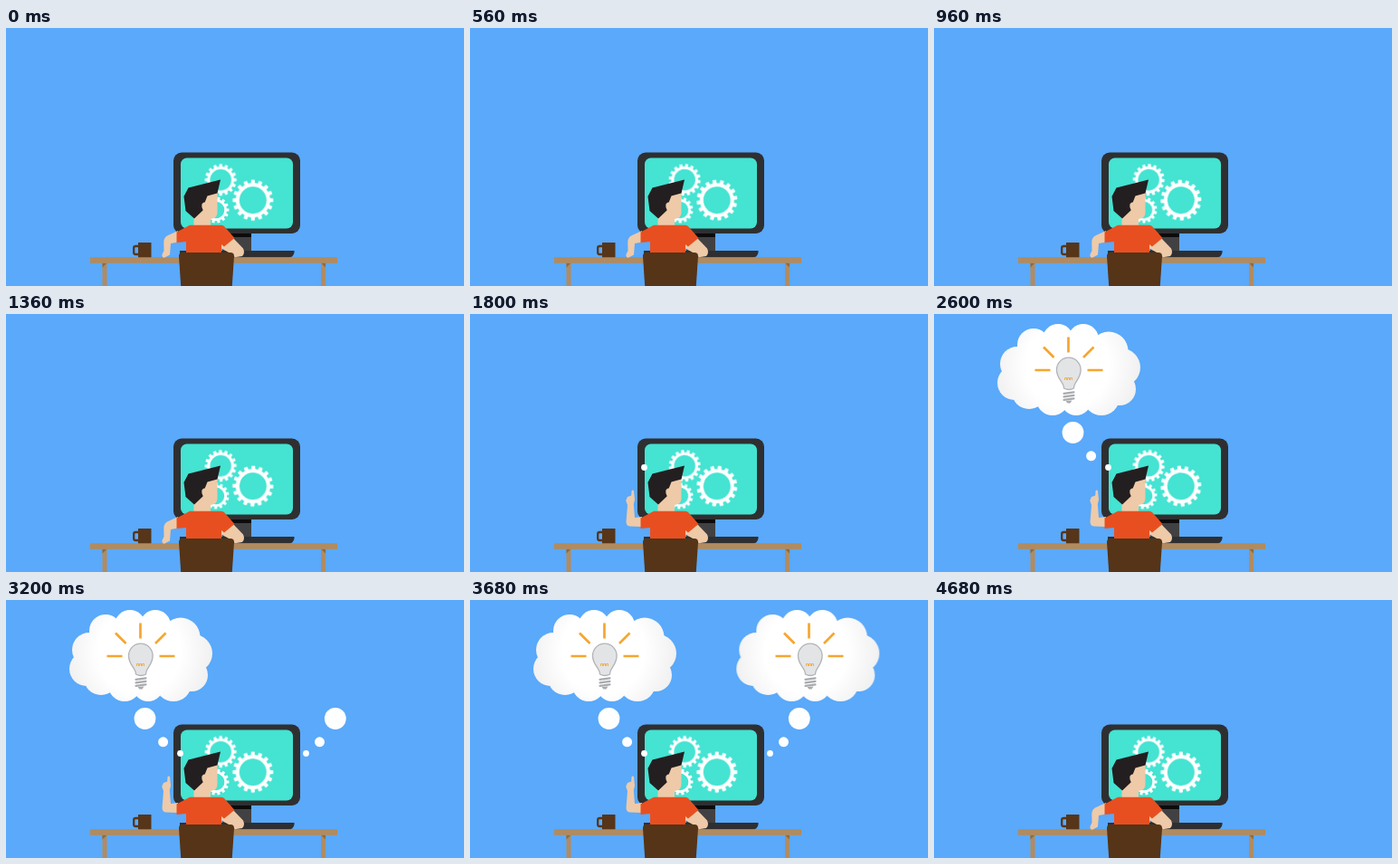
An HTML page for the animation above (4.72 s loop, 506 px wide and 285 px high).

```html
<!DOCTYPE html>
<html lang="en">
<head>
<meta charset="utf-8">
<title>Idea at the desk</title>
<style>
  html, body { margin: 0; width: 100%; height: 100%; overflow: hidden; background: #5aa9fa; }
  svg { display: block; width: 506px; height: 285px; }
  .late { opacity: 0; }
</style>
</head>
<body>
<svg viewBox="0 0 506 285">
  <defs>
    <radialGradient id="puff" gradientUnits="userSpaceOnUse" cx="147" cy="57" r="84">
      <stop offset=".55" stop-color="#fff"/>
      <stop offset="1" stop-color="#efeff0"/>
    </radialGradient>
    <g id="cloud" fill="url(#puff)"></g>
    <g id="bulb">
      <path d="M143.500 82 C143.500 75 135.500 72 135.500 61.500 A13.300 13.300 0 0 1 162.100 61.500 C162.100 72 154.500 75 154.500 82 Q149 85 143.500 82Z"
        fill="#e3e4e6" stroke="#b1b3b6" stroke-width="1.300"/>
      <path d="M144.500 73 V70.500 H146.500 V73 M147.500 73 V70.500 H149.500 V73 M150.500 73 V70.500 H152.500 V73"
        fill="none" stroke="#f2b04a" stroke-width="1"/>
      <path d="M143.500 87.800 L154.500 86.300 M143.500 91.300 L154.500 89.800 M143.500 94.800 L154.500 93.300"
        stroke="#a9abae" stroke-width="2.200" stroke-linecap="round"/>
      <path d="M145.500 96 L152.500 95.500 L150.500 98.600 H147.500Z" fill="#a9abae"/>
    </g>
    <path id="rays" d="M148.500 25.500V42.500 M121 36.500L132.500 48 M176.500 36.500L165 48 M111.500 62H128.500 M169.500 62H186.500"
      stroke="#f5a631" stroke-width="2.700"/>
  </defs>

  <rect width="506" height="285" fill="#5aa9fa"/>

  <!-- monitor -->
  <rect x="239" y="226" width="32" height="20" fill="#414143"/>
  <rect x="239" y="226" width="32" height="5" fill="#0c0c0d"/>
  <path d="M192 246H318.500V248Q317.500 253.500 312 253.500H192Z" fill="#2f2f31"/>
  <rect x="185" y="137.500" width="140" height="89.500" rx="9" fill="#2f2f31"/>
  <rect x="193" y="143.500" width="124" height="78" rx="7" fill="#44e3d2"/>
  <g id="gears" fill="#fff" fill-rule="evenodd"></g>

  <!-- desk and mug -->
  <path d="M106.500 259H111.500V285H106.500Z M348 259H353V285H348Z" fill="#b18b60"/>
  <path d="M106.500 259.500H111.500L106.500 264.500Z M348 259.500H353V264.500Z" fill="#8b6a45"/>
  <rect x="93" y="253.300" width="273" height="6.500" fill="#b18b60"/>
  <rect x="141.200" y="241" width="8" height="9" rx="2" fill="none" stroke="#573518" stroke-width="2.300"/>
  <rect x="146" y="237" width="14.500" height="16.300" fill="#573518"/>

  <!-- person -->
  <g fill="#eecaa8">
    <path id="rest" d="M190 224L178 229.500Q174.500 231.500 174.300 236L174.500 246L172.500 250Q172 253.500 175 253.800L181 250.500L182 238L190 236.500Z"/>
    <path id="raise" class="late" d="M190 224L182 225L180.800 210L182 205L181 195.500Q180 193.500 178.500 195.500L178.200 200.500L174 202L172.200 206L174 211L172.500 230Q173 234.500 177 234.500L190 235Z"/>
    <path d="M250 231L262 243.500Q264.500 249 261 252L253 253.300L248 249L237 243V238Z"/>
    <path d="M212 184L233.500 181L233.500 204Q233.300 209.500 228 210.500L226 211V218H207.500V205Z"/>
  </g>
  <path d="M203 217.800H238Q240 217.800 241.500 219.500L252.500 232L241 241.500L238 239V249H199V236L188.500 237V225.500Z" fill="#e84f20"/>
  <path d="M201.500 176.500L237 167.500L233.500 182.500L222.500 185.500L219.500 193L217.500 201.500L208 210.500L198.500 202L196.500 186Z" fill="#231f20"/>
  <path d="M222.500 194Q218 190.500 216.300 195Q216 201 220.500 203Z" fill="#eecaa8"/>
  <path d="M191 252Q191 248 195 248H248Q252 248 252 252L249.800 285H193.200Z" fill="#553417"/>

  <g id="thoughts" fill="#fff"></g>
</svg>
<script>
const LOOP = 4720, RESET = 4680, SPIN = 2680, TICK = 40;
const SVG = 'http://www.w3.org/2000/svg';
const byId = id => document.getElementById(id);

function add(parent, tag, attrs) {
  const el = document.createElementNS(SVG, tag);
  for (const key in attrs) el.setAttribute(key, attrs[key]);
  return parent.appendChild(el);
}

function play(el, frames) {
  el.animate(frames, { duration: LOOP, iterations: Infinity }).startTime = 0;
}

// Switches opacity at the given time and back at the reset.
function flip(el, time, before = 0) {
  const key = (t, opacity) => ({ offset: t / LOOP, opacity, easing: 'step-end' });
  play(el, [key(0, before), key(time, 1 - before), key(RESET, before), key(LOOP, before)]);
}

function gearPath(teeth, outer, body, hole) {
  const pitch = 2 * Math.PI / teeth, points = [];
  for (let i = 0; i < teeth; i++) {
    for (const [shift, r] of [[-.29, body], [-.23, outer], [.23, outer], [.29, body]]) {
      const a = (i + shift) * pitch;
      points.push((r * Math.cos(a)).toFixed(2) + ' ' + (r * Math.sin(a)).toFixed(2));
    }
  }
  return `M${points.join('L')}Z M${hole} 0A${hole} ${hole} 0 1 0 ${-hole} 0A${hole} ${hole} 0 1 0 ${hole} 0Z`;
}

function gear(x, y, teeth, outer, body, hole, turn) {
  const place = add(byId('gears'), 'g', { transform: `translate(${x} ${y})` });
  const wheel = add(place, 'path', { d: gearPath(teeth, outer, body, hole) });
  const key = (t, deg, easing) => ({ offset: t / LOOP, transform: `rotate(${deg}deg)`, easing });
  play(wheel, [
    key(0, 0, `steps(${SPIN / TICK}, end)`),
    key(SPIN, turn, 'step-end'),
    key(RESET, 0, 'step-end'),
    key(LOOP, 0, 'linear')
  ]);
}

gear(237.2, 167.7, 16, 17.6, 14.8, 11.8, -180);
gear(232, 201, 14, 14.5, 12, 9.3, 180);
gear(272.8, 190.2, 16, 22.5, 19, 15, 180);

const puffs = [
  [110, 34, 18], [137, 28, 17], [165, 28, 17], [193, 41, 21.500], [207, 59, 21],
  [205, 83, 18], [185, 92, 20], [157, 95, 17], [131, 94, 18], [105, 86, 19],
  [89, 76, 19], [92, 55, 19]
];
for (const [cx, cy, r] of puffs) add(byId('cloud'), 'circle', { cx, cy, r });
add(byId('cloud'), 'ellipse', { cx: 149, cy: 62, rx: 58, ry: 40 });

const thoughts = byId('thoughts');

function dot(cx, cy, r, time) {
  flip(add(thoughts, 'circle', { cx, cy, r, class: 'late' }), time);
}

function part(name, x, time) {
  flip(add(thoughts, 'use', { href: '#' + name, x, class: 'late' }), time);
}

function thought(dots, shifts, times) {
  dots.forEach((x, i) => dot(x, [169.5, 156.8, 131][i], [3.4, 5.5, 11.9][i], times[i]));
  ['cloud', 'bulb', 'rays'].forEach((name, i) => part(name, shifts[i], times[i + 3]));
}

thought([192.5, 173.6, 153.5], [0, 0, 0], [1680, 1880, 2040, 2200, 2360, 2520]);
thought([331.5, 346.5, 363.8], [224.3, 227, 226], [2840, 3040, 3200, 3360, 3520, 3680]);

flip(byId('rest'), 1520, 1);
flip(byId('raise'), 1520);
</script>
</body>
</html>
```
